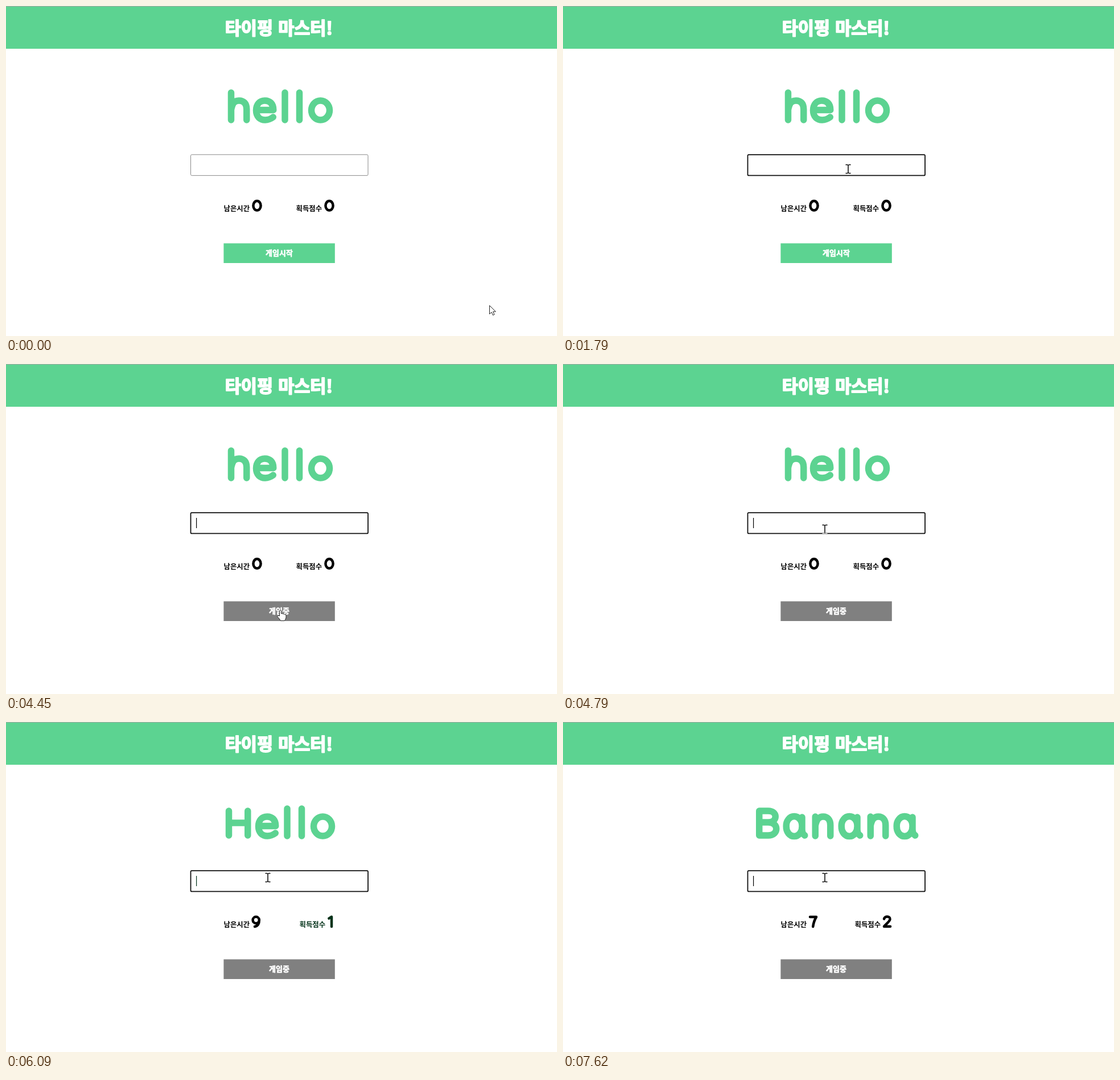
An HTML page with a canvas that plays this animation: 968 by 579 pixels, repeating every 8 s.

```html
<!DOCTYPE html>
<html lang="ko">
<head>
<meta charset="utf-8">
<title>타이핑 마스터!</title>
<style>
html, body { margin: 0; width: 100%; height: 100%; overflow: hidden; background: #fff; }
canvas { display: block; }
</style>
</head>
<body>
<canvas id="stage" width="968" height="579" aria-label="타이핑 마스터! 단어 입력 게임"></canvas>
<script>
const ctx = document.getElementById('stage').getContext('2d');
const LOOP = 8000;
const GREEN = '#5cd391';
const KOREAN = '"Noto Sans CJK KR", "Noto Sans CJK", sans-serif';
const INPUT = { x: 324.5, y: 260.8, w: 311.5, h: 36.6 };
const BUTTON = { x: 382.4, y: 416.4, w: 195.4, h: 34.6 };

// Rounded lettering: [advance, centre line]
const LETTERS = {
  h: [48.5, 'M12.75 6V54M12.75 36C15 25 18 20 26.5 20C35 20 40 25 40 35V54'],
  e: [46, 'M9 36.5H38.5C38.5 25 32 20 23.5 20C14 20 8.25 27 8.25 37C8.25 48 15 54 24 54C30 54 34 52 38 49'],
  l: [25.5, 'M12.75 6V54'],
  o: [49, 'M40.25 37A16 17 0 1 1 8.25 37A16 17 0 1 1 40.25 37Z'],
  H: [56.5, 'M12.75 10V53M46 10V53M12.75 31H46'],
  B: [51, 'M10.25 10V53M10.25 10H26C43 10 43 30 26 30H10.25M26 30C45 30 45 53 26 53H10.25'],
  a: [46, 'M34.5 37A13.9 16.5 0 1 1 6.75 37A13.9 16.5 0 1 1 34.5 37ZM34.5 21V42C34.5 48 36 51 39.25 53'],
  n: [51, 'M11.75 20V54M11.75 36C14 25 18 20 25.5 20C33 20 38.25 25 38.25 35V54']
};
const DIGITS = {
  0: [20, 'M16.6 11.3A6.6 8.2 0 1 1 3.4 11.3A6.6 8.2 0 1 1 16.6 11.3Z'],
  1: [14, 'M3.3 5.6L8 2.8V20'],
  2: [17, 'M3 6.5C4 1 14 1 13.5 7C13 11 7 15 3 19.8H14'],
  7: [17, 'M3 3H14C11 8 9 14 8.2 20'],
  8: [18, 'M14 7A5 4.2 0 1 1 4 7A5 4.2 0 1 1 14 7ZM15 15.6A6 4.5 0 1 1 3 15.6A6 4.5 0 1 1 15 15.6Z'],
  9: [17, 'M13.8 8.5A5.6 5.7 0 1 1 2.6 8.5A5.6 5.7 0 1 1 13.8 8.5C13.8 15 12 19 6 20']
};
for (const set of [LETTERS, DIGITS])
  for (const key in set) set[key][1] = new Path2D(set[key][1]);

// Each entry holds from its time until the next one
const WORD = [[0, 'hello'], [6090, 'Hello'], [7620, 'Banana']];
const TIME = [[0, 0], [5530, 9], [6490, 8], [7520, 7]];
const SCORE = [[0, 0], [6090, 1], [7620, 2]];
const FOCUS = [[0, false], [1260, true], [4320, false], [4450, true]];
const CARET = [[0, false], [1260, true], [1790, false], [2190, true], [3330, false],
  [3790, true], [4320, false], [4450, true], [5060, false], [5530, true]];
const TYPED = [[0, ''], [2190, 'h'], [2320, 'he'], [2450, 'hel'], [2600, 'hell'], [2800, ''],
  [5600, 'h'], [5670, 'he'], [5820, 'hel'], [5910, 'hell'], [6090, ''],
  [6690, 'h'], [7220, 'he'], [7320, 'hel'], [7420, 'hell'], [7620, '']];
// Pointer path: time, x, y, eased on arrival
const MOUSE = [[0, 849, 525], [70, 849, 525], [770, 501, 286, true], [3790, 501, 286],
  [4250, 482, 431, true], [4450, 482, 431], [4580, 477, 397], [4790, 460, 290], [5000, 460, 273]];

function at(track, t) {
  let value = track[0][1];
  for (const [start, v] of track) if (t >= start) value = v;
  return value;
}

function mouseAt(t) {
  const i = MOUSE.findIndex(k => k[0] > t);
  if (i < 0) return MOUSE[MOUSE.length - 1].slice(1, 3);
  const [t0, x0, y0] = MOUSE[i - 1], [t1, x1, y1, eased] = MOUSE[i];
  let p = (t - t0) / (t1 - t0);
  if (eased) p = p * p * (3 - 2 * p);
  return [Math.round(x0 + (x1 - x0) * p), Math.round(y0 + (y1 - y0) * p)];
}

const inside = (r, x, y) => x >= r.x && x <= r.x + r.w && y >= r.y && y <= r.y + r.h;

function strokeGlyph(path, x, y, width, color) {
  ctx.save();
  ctx.translate(x, y);
  ctx.lineWidth = width;
  ctx.lineCap = ctx.lineJoin = 'round';
  ctx.strokeStyle = color;
  ctx.stroke(path);
  ctx.restore();
}

function text(str, x, y, font, color, soften = 0) {
  ctx.font = font;
  ctx.fillStyle = ctx.strokeStyle = color;
  ctx.fillText(str, x, y);
  if (soften) {
    ctx.lineWidth = soften;
    ctx.lineJoin = 'round';
    ctx.strokeText(str, x, y);
  }
}

function drawWord(word) {
  const width = [...word].reduce((sum, c) => sum + LETTERS[c][0], 0);
  let x = 480 - width / 2;
  for (const c of word) {
    strokeGlyph(LETTERS[c][1], x, 146, 11.5, GREEN);
    x += LETTERS[c][0];
  }
}

function drawCounter(label, value, x, color) {
  text(label, x - 48.5, 360, `900 12.4px ${KOREAN}`, color);
  strokeGlyph(DIGITS[value][1], x, 339, 4.5, color);
}

function drawInput(t, hover, ink) {
  const focus = at(FOCUS, t);
  ctx.lineWidth = focus ? 1.8 : 1;
  ctx.strokeStyle = focus ? '#101010' : hover ? '#666' : '#8a8a8a';
  ctx.beginPath();
  ctx.roundRect(INPUT.x, INPUT.y, INPUT.w, INPUT.h, 2);
  ctx.stroke();
  const typed = at(TYPED, t);
  text(typed, 334, 284.5, '16px "Liberation Sans", Arial, sans-serif', '#000');
  if (at(CARET, t)) {
    ctx.fillStyle = ink;
    ctx.fillRect(Math.round(334 + ctx.measureText(typed).width), 270, 1.2, 18);
  }
}

function drawButton(playing) {
  ctx.fillStyle = playing ? '#808080' : GREEN;
  ctx.fillRect(BUTTON.x, BUTTON.y, BUTTON.w, BUTTON.h);
  ctx.textAlign = 'center';
  text(playing ? '게임중' : '게임시작', 480, 438.2, `900 13px ${KOREAN}`, '#fff', .6);
  ctx.textAlign = 'left';
}

const ARROW = new Path2D('M.5 .5V15.5L4 12.2L6.4 17.5L9 16.4L6.6 11.2H11.3Z');
const HAND = new Path2D('M4.5 11V1.8Q6 -.5 7.5 1.8V7Q9.5 5.8 10.5 7.6Q12.5 6.6 13.5 8.4Q16 7.8 16 10V14Q15 18 13 19.5H6.5Q4.5 16 1 12.5Q.5 9.5 4.5 11Z');
const BEAM = new Path2D('M-4.5 -7.5H-1.5L0 -6.5L1.5 -7.5H4.5M0 -6.5V6.5M-4.5 7.5H-1.5L0 6.5L1.5 7.5H4.5');

function drawPointer(x, y) {
  ctx.save();
  if (inside(INPUT, x, y)) {
    ctx.globalCompositeOperation = 'difference';
    ctx.translate(x, y);
    ctx.strokeStyle = '#fff';
    ctx.lineWidth = 1.5;
    ctx.stroke(BEAM);
  } else {
    const hand = inside(BUTTON, x, y);
    ctx.translate(hand ? x - 6 : x, y);
    ctx.fillStyle = '#fff';
    ctx.strokeStyle = '#222';
    ctx.lineWidth = 1;
    ctx.fill(hand ? HAND : ARROW);
    ctx.stroke(hand ? HAND : ARROW);
  }
  ctx.restore();
}

function draw(t) {
  const [mx, my] = mouseAt(t);
  const score = at(SCORE, t);
  const ink = score === 1 ? '#04331a' : '#000';

  ctx.fillStyle = '#fff';
  ctx.fillRect(0, 0, 968, 579);
  ctx.fillStyle = GREEN;
  ctx.fillRect(0, 0, 968, 75);
  ctx.fillStyle = '#9fa8a2';
  ctx.fillRect(0, 0, 968, 1);

  const titleFont = `900 30.5px ${KOREAN}`;
  text('타이핑', 384.8, 49.8, titleFont, '#fff', 1.9);
  text('마스터!', 478.2, 49.8, titleFont, '#fff', 1.9);

  drawWord(at(WORD, t));
  drawInput(t, inside(INPUT, mx, my), ink);
  drawCounter('남은시간', at(TIME, t), 431, '#000');
  drawCounter('획득점수', score, 578 - DIGITS[score][0], ink);
  drawButton(t >= 4450);
  drawPointer(mx, my);
}

function frame() {
  draw(performance.now() % LOOP);
  requestAnimationFrame(frame);
}
frame();
</script>
</body>
</html>
```
